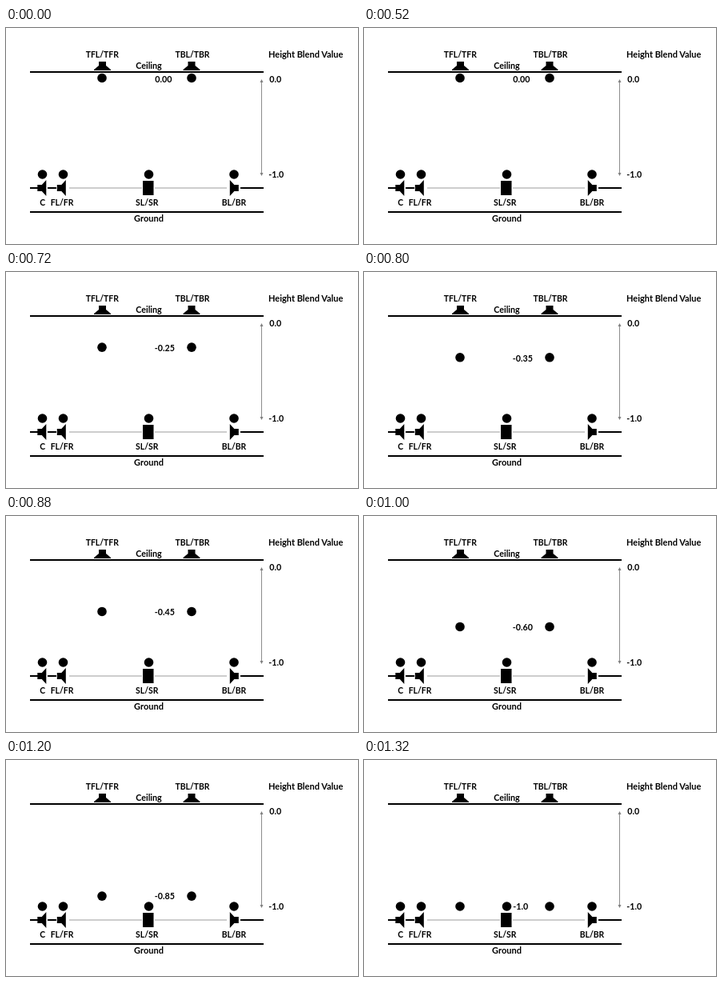
An HTML page for the animation above (2.64 s loop, 440 by 270 pixels).

```html
<!DOCTYPE html>
<html lang="en">
<head>
<meta charset="utf-8">
<title>Height Blend Value</title>
<style>
  html, body { margin: 0; width: 100%; height: 100%; overflow: hidden; background: #fff; }
  svg { display: block; width: 440px; height: 270px; }
  text { font: bold 11px Lato, "Open Sans", sans-serif; fill: #000; }
  .mid { text-anchor: middle; }
  .tag { font-size: 10.4px; text-anchor: middle; }
  .num { font-size: 10.7px; }
  .bar { stroke: #000; stroke-width: 2; }
  .rail { stroke: #bdbdbd; stroke-width: 1.6; }
  .axis { stroke: #8c8c8c; stroke-width: 1; }
  .tip { fill: #808080; }
</style>
</head>
<body>
<svg viewBox="0 0 440 270">
  <defs>
    <path id="speaker" d="M-5.5-4H0L5.5-10V10L0 4H-5.5Z"/>
    <path id="overhead" d="M-4.5-11H4.5V-6L10.5-1V0H-10.5V-1L-4.5-6Z"/>
    <circle id="dot" r="5.8"/>
  </defs>

  <path class="bar" d="M30 55H322M30 230H322M30 200H40M52 200H63M293 200H322"/>
  <path class="rail" d="M79 200H170M186 200H276"/>

  <use href="#overhead" x="120.5" y="53"/>
  <use href="#overhead" x="232" y="53"/>
  <use href="#speaker" x="44.8" y="200"/>
  <use href="#speaker" x="69.3" y="200"/>
  <use href="#speaker" transform="translate(285.3 200) scale(-1 1)"/>
  <rect x="171" y="191" width="13.5" height="18"/>

  <use href="#dot" x="45.5" y="183"/>
  <use href="#dot" x="71.5" y="183"/>
  <use href="#dot" x="178.5" y="183"/>
  <use href="#dot" x="285" y="183"/>

  <path class="axis" d="M319.5 66V183"/>
  <path class="tip" d="M319.5 64L321.5 68H317.5ZM319.5 185L321.5 181H317.5Z"/>

  <text class="tag" x="120.3" y="37.3">TFL/TFR</text>
  <text class="tag" x="233" y="37.3">TBL/TBR</text>
  <text class="mid" x="178.5" y="51.3" style="font-size:10.7px">Ceiling</text>
  <text x="328" y="37.3">Height Blend Value</text>
  <text class="num" x="329.3" y="68.2">0.0</text>
  <text class="num" x="328.3" y="186.8">-1.0</text>
  <text class="tag" x="45.7" y="222">C</text>
  <text class="tag" x="70" y="222">FL/FR</text>
  <text class="tag" x="176.2" y="222">SL/SR</text>
  <text class="tag" x="285" y="222">BL/BR</text>
  <text class="mid" x="178.5" y="242.2">Ground</text>

  <use id="front" href="#dot" x="120" y="62.5"/>
  <use id="back" href="#dot" x="232" y="62.5"/>
  <text id="value" class="num" x="186.3" y="68.2">0.00</text>
</svg>
<script>
  const LOOP = 2640, HOLD = 520, TICK = 40, STEPS = 20, FLOOR = 183;
  const [front, back, value] = ["front", "back", "value"].map(id => document.getElementById(id));
  const start = performance.now();

  function label(step) {
    if (step === 0) return "0.00";
    if (step === STEPS) return "-1.0";
    return (-step / STEPS).toFixed(2);
  }

  function draw(time) {
    const step = Math.max(0, Math.min(STEPS, Math.floor((time - HOLD) / TICK)));
    const dotY = Math.min(FLOOR, 62.5 + step * 6.33);
    const textY = Math.min(FLOOR, 64.4 + step * 6.2) + 3.8;
    front.setAttribute("y", dotY);
    back.setAttribute("y", dotY);
    value.setAttribute("x", step === 0 || step === STEPS ? 186.3 : 185.8);
    value.setAttribute("y", textY);
    value.textContent = label(step);
  }

  function frame() {
    draw((performance.now() - start) % LOOP);
    requestAnimationFrame(frame);
  }
  frame();
</script>
</body>
</html>
```
